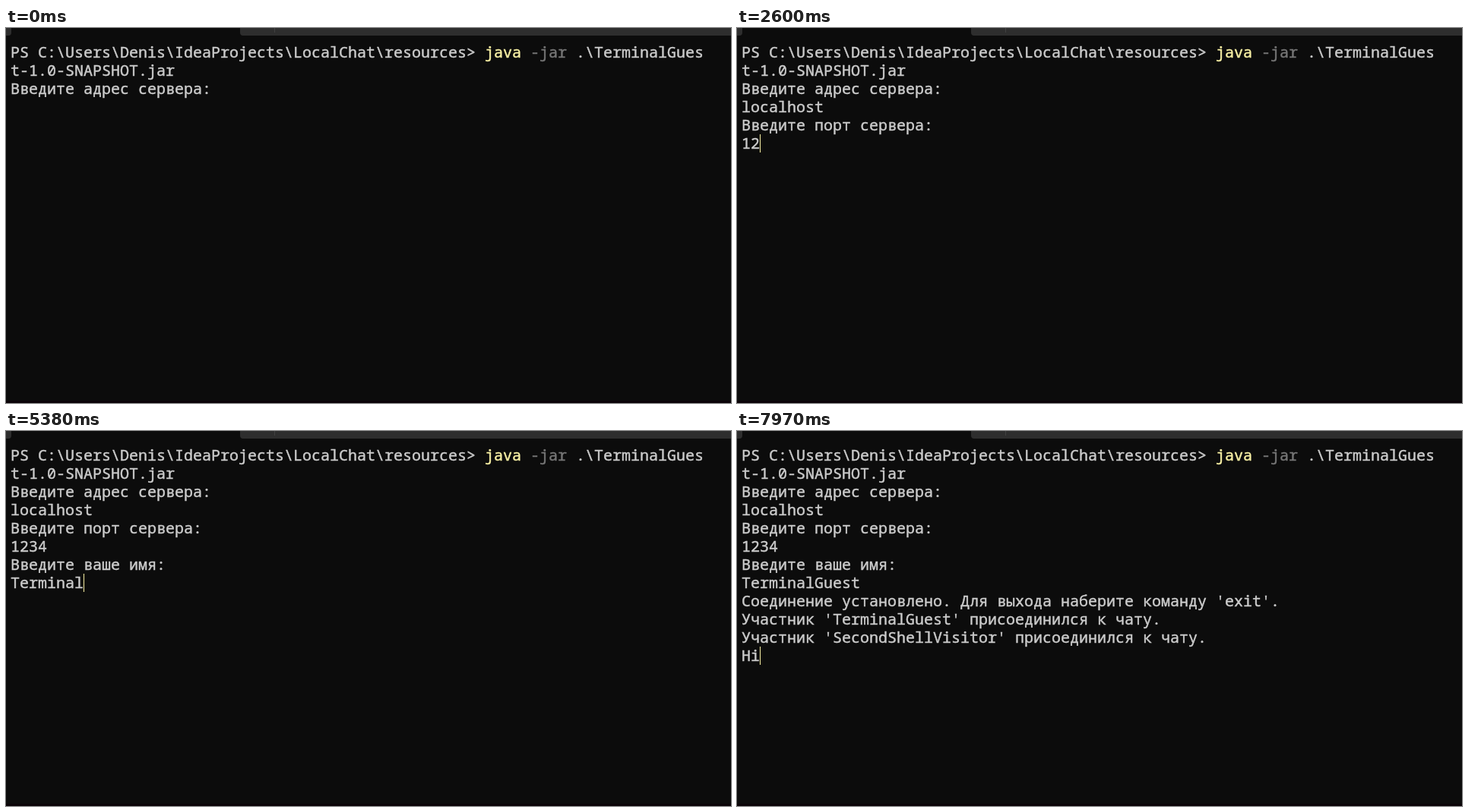
An HTML page for the animation above (8 s loop, 954x494 px).

```html
<!DOCTYPE html>
<html lang="ru">
<head>
<meta charset="utf-8">
<title>Console chat</title>
<style>
  html, body { margin: 0; width: 100%; height: 100%; overflow: hidden; background: #0c0c0c; }
  svg { display: block; width: 100vw; height: 100vh; }
  text, tspan { fill: currentColor; stroke: currentColor; stroke-width: 0.45px; }
  text { font: 20px "Noto Sans Mono", "DejaVu Sans Mono", monospace; color: #ccc; white-space: pre; }
  .cmd { color: #f9f1a5; }
  .flag { color: #767676; }
</style>
</head>
<body>
<svg viewBox="0 0 954 494">
  <rect width="954" height="494" fill="#0c0c0c"/>
  <path d="M0 0H7V6Q7 10 3 10H0ZM308 0H954V10H312Q308 10 308 6Z" fill="#2e2e2e"/>
  <rect x="353" width="1" height="6" fill="#414141"/>
  <rect y="491" width="954" height="3" fill="#0b0408"/>
  <text x="6" y="39">PS C:\Users\Denis\IdeaProjects\LocalChat\resources> <tspan class="cmd">java</tspan> <tspan class="flag">-jar</tspan> .\TerminalGues</text>
  <g id="screen"></g>
  <rect id="caret" width="1" height="24"/>
</svg>
<script>
const LOOP = 8000, LEFT = 6, TOP = 20, CELL = 12, ROW = 24, ASCENT = 19;

// Each block prints its lines at a time, then takes keys on the row below.
const blocks = [
  { at: 0, lines: ["t-1.0-SNAPSHOT.jar", "Введите адрес сервера:"],
    input: "localhost", keys: [70, 270, 380, 490, 600, 1070, 1270, 1410, 1540] },
  { at: 1870, lines: ["Введите порт сервера:"],
    input: "1234", keys: [2470, 2600, 2730, 2930] },
  { at: 3270, lines: ["Введите ваше имя:"],
    input: "TerminalGuest",
    keys: [3860, 3990, 4190, 4320, 4580, 4780, 4850, 5380, 5450, 5720, 6120, 6310, 6450] },
  { at: 6980, lines: [
      "Соединение установлено. Для выхода наберите команду 'exit'.",
      "Участник 'TerminalGuest' присоединился к чату.",
      "Участник 'SecondShellVisitor' присоединился к чату."],
    input: "Hi", keys: [7640, 7970] }
];
const caretFlips = [1270, 1870, 2540, 3270, 3860, 4320, 5380];

const screen = document.getElementById("screen");
const caret = document.getElementById("caret");
const passed = (times, t) => times.filter(at => at <= t).length;

function addRow(row) {
  const el = document.createElementNS("http://www.w3.org/2000/svg", "text");
  el.setAttribute("x", LEFT);
  el.setAttribute("y", TOP + row * ROW + ASCENT);
  return screen.appendChild(el);
}

let row = 1;
for (const block of blocks) {
  block.rows = block.lines.map(() => addRow(row++));
  block.inputRow = row;
  block.field = addRow(row++);
}

function setText(el, value) {
  if (el.textContent !== value) el.textContent = value;
}

function draw(t) {
  for (const block of blocks) {
    const shown = t >= block.at;
    const typed = passed(block.keys, t);
    block.rows.forEach((el, i) => setText(el, shown ? block.lines[i] : ""));
    setText(block.field, block.input.slice(0, typed));
    if (shown) {
      caret.setAttribute("x", LEFT + typed * CELL);
      caret.setAttribute("y", TOP + block.inputRow * ROW);
    }
  }
  caret.setAttribute("visibility", t < blocks[0].keys[0] ? "hidden" : "visible");
  caret.setAttribute("fill", passed(caretFlips, t) % 2 ? "#f9f1a5" : "#fff");
}

const start = performance.now();
function tick(now) {
  draw(Math.max(0, now - start) % LOOP);
  requestAnimationFrame(tick);
}
draw(0);
requestAnimationFrame(tick);
</script>
</body>
</html>
```
